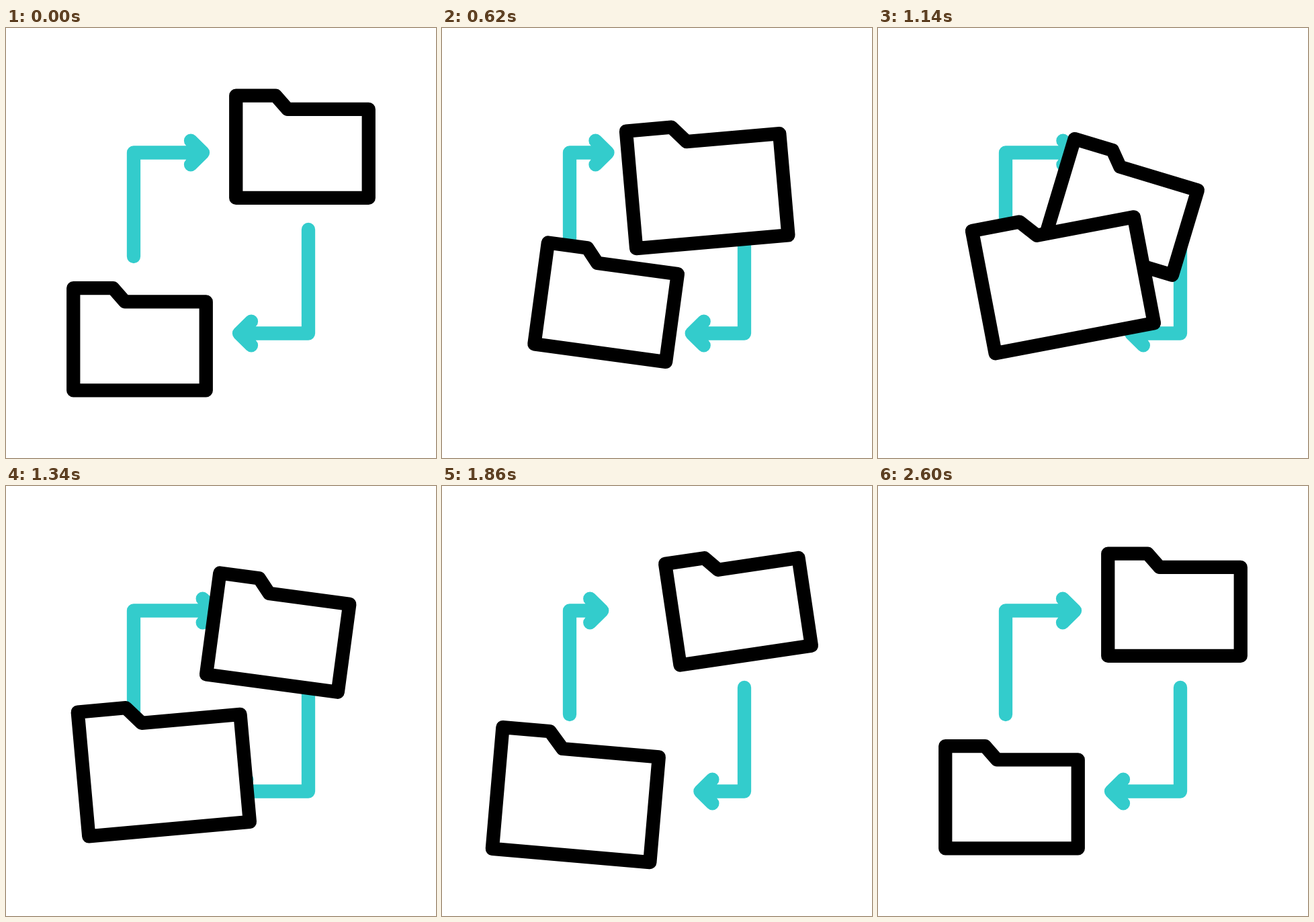
An HTML page with a canvas that plays this animation: 640 px wide and 640 px high, repeating every 3000 ms.

```html
<!DOCTYPE html>
<html lang="en">
<head>
<meta charset="utf-8">
<title>Folder exchange</title>
<style>
  html, body { margin: 0; width: 100%; height: 100%; overflow: hidden; background: #fff; }
  canvas { display: block; width: 100vw; height: 100vh; object-fit: contain; }
</style>
</head>
<body>
<canvas id="stage" width="640" height="640"></canvas>
<script>
const SIZE = 640;
const LOOP = 3000;
const ctx = document.getElementById('stage').getContext('2d');

// Phases of the exchange, in ms
const START = 200;
const LEAN = 1100;
const ARRIVE = 1700;
const SETTLED = 2440;

// Folder centres mirror each other about the middle of the stage
const OFFSET_X = 121;
const OFFSET_Y = 143.25;
const HALF_W = 98.75;
const HALF_H = 76.15;
const TAB = 20.3;

const mix = (a, b, p) => a + (b - a) * p;
const ease = p => p * p * (3 - 2 * p);
const clamp = (v, low, high) => Math.min(Math.max(v, low), high);
const ramp = (t, from, to) => ease(clamp((t - from) / (to - from), 0, 1));

// Leans one way, swings to the other side, then levels out
function tiltAt(t, lean, rebound) {
  return lean * ramp(t, START, LEAN)
    + (rebound - lean) * ramp(t, LEAN, ARRIVE)
    - rebound * ramp(t, ARRIVE, SETTLED);
}

// Pulls back, overshoots forward, then mirrors that in time
function pullAt(t) {
  const swing = 2 - Math.abs(clamp(t / 560, 0, 4) - 2);
  return swing < 1 ? -55 * ease(swing) : mix(-55, 18, ease(swing - 1));
}

function drawArrow(pull) {
  const tip = 293 + pull;
  ctx.strokeStyle = '#33cccc';
  ctx.beginPath();
  ctx.moveTo(190, 340);
  ctx.lineTo(190, 185.5);
  ctx.lineTo(tip, 185.5);
  ctx.moveTo(tip - 18, 167.6);
  ctx.lineTo(tip, 185.5);
  ctx.lineTo(tip - 18, 203.4);
  ctx.stroke();
}

// The outline scales while its line weight stays the same
function drawFolder(x, y, degrees, scale) {
  ctx.save();
  ctx.translate(x, y);
  ctx.rotate(degrees * Math.PI / 180);
  ctx.scale(scale, scale);
  ctx.beginPath();
  ctx.moveTo(-HALF_W, -HALF_H);
  ctx.lineTo(-HALF_W + 59, -HALF_H);
  ctx.lineTo(-HALF_W + 76.75, -HALF_H + TAB);
  ctx.lineTo(HALF_W, -HALF_H + TAB);
  ctx.lineTo(HALF_W, HALF_H);
  ctx.lineTo(-HALF_W, HALF_H);
  ctx.closePath();
  ctx.restore();
  ctx.fillStyle = '#fff';
  ctx.fill();
  ctx.strokeStyle = '#000';
  ctx.stroke();
}

function draw(t) {
  ctx.fillStyle = '#fff';
  ctx.fillRect(0, 0, SIZE, SIZE);
  ctx.lineWidth = 20.3;
  ctx.lineCap = ctx.lineJoin = 'round';

  drawArrow(pullAt(t - START));
  ctx.save();
  ctx.translate(SIZE, SIZE);
  ctx.rotate(Math.PI);
  drawArrow(pullAt(t - START - 160));
  ctx.restore();

  const travel = ramp(t, START, ARRIVE);
  const settle = ramp(t, ARRIVE, SETTLED);
  const side = 1 - 2 * travel;
  const mid = SIZE / 2;
  const drift = travel - settle;
  const growth = 1 + 0.218 * (ramp(t, START, 870) - settle);

  drawFolder(mid - OFFSET_X * side, mid + OFFSET_Y * side, tiltAt(t, 17.1, -9.6), 1);
  drawFolder(mid + OFFSET_X * side + drift, mid - OFFSET_Y * side - 4.2 * drift,
    tiltAt(t, -11, 5.6), growth);
}

function tick() {
  draw(performance.now() % LOOP);
  requestAnimationFrame(tick);
}
tick();
</script>
</body>
</html>
```
